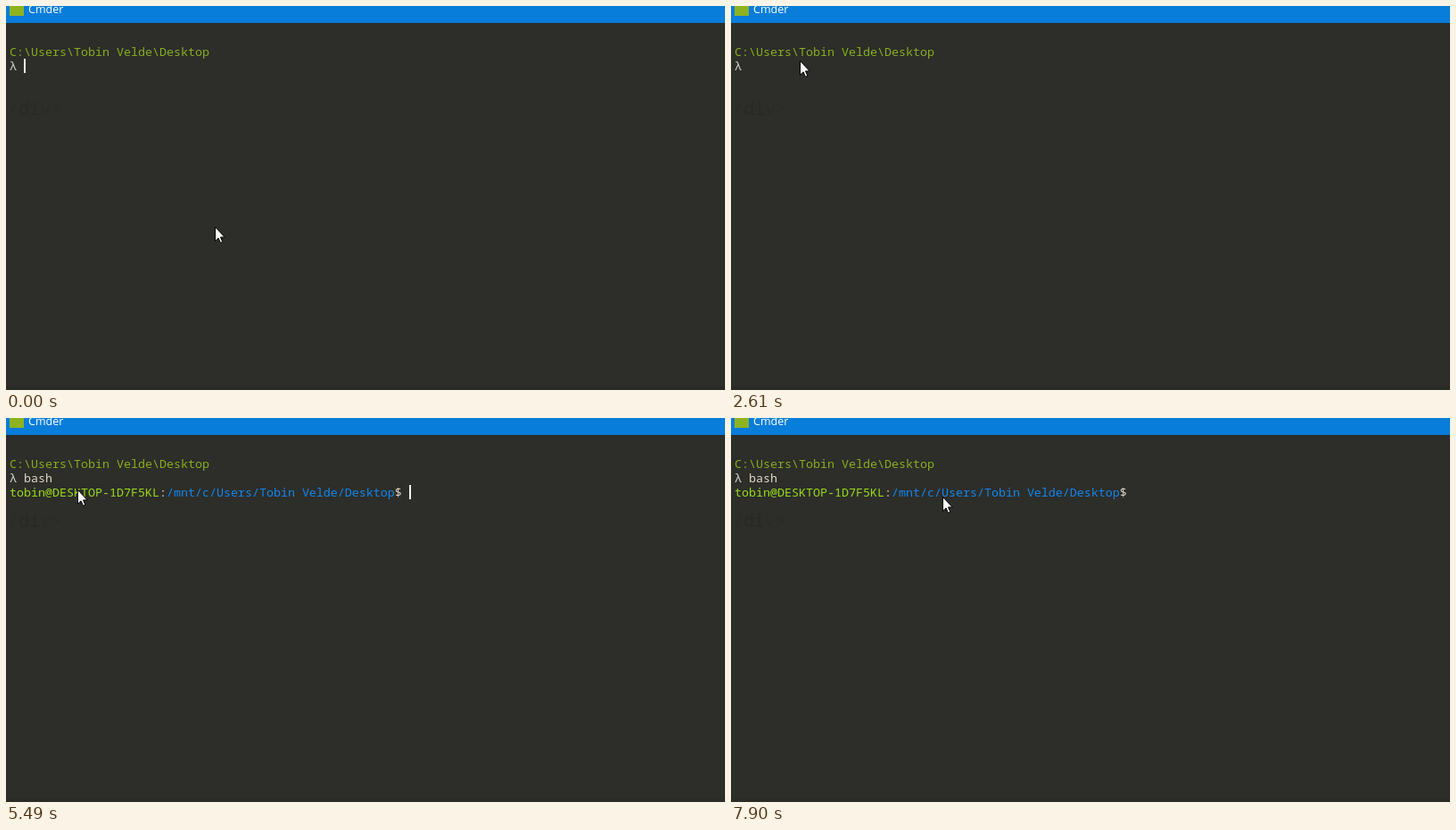
Write an HTML page that moves like this. It is 806 px wide and 430 px high and loops after 8 s.

```html
<!DOCTYPE html>
<html lang="en">
<head>
<meta charset="utf-8">
<title>Terminal</title>
<style>
  html, body { margin: 0; width: 100%; height: 100%; overflow: hidden; background: #2d2d29; }
  svg { display: block; width: 806px; height: 430px; }
  text { white-space: pre; }
  .mono { font: 13.333px "Noto Sans Mono", "DejaVu Sans Mono", monospace; }
  .title { font: 12.5px "Open Sans", "Noto Sans", sans-serif; fill: #fff; }
  .ghost { font-size: 20px; fill: #2b2b27; }
  .path { fill: #86b01e; }
  .plain { fill: #d6d4ca; }
  .input { fill: #e2dac6; }
  .user { fill: #98dc18; }
  .dir { fill: #1088f0; }
  .picked { fill: #2d2d29; }
  #beam { mix-blend-mode: difference; }
</style>
</head>
<body>
<svg viewBox="0 0 806 430">
  <defs>
    <clipPath id="pickedArea"><rect id="clip" height="16"/></clipPath>
  </defs>
  <rect width="806" height="430" fill="#2d2d29"/>
  <rect y="426" width="806" height="4" fill="#2a2a26"/>
  <rect width="806" height="19" fill="#087dda"/>
  <rect x="4" y="-5" width="16" height="16" fill="#8fb31f"/>
  <text class="title" x="25" y="8">Cmder</text>
  <text class="mono ghost" x="2" y="122">/<tspan fill="#282924">di</tspan>v&gt;</text>

  <g class="mono">
    <text class="path" x="4" y="56">C:\Users\Tobin Velde\Desktop</text>
    <text class="plain" x="4" y="72">λ</text>
    <text class="input" id="command" x="20" y="72"></text>
    <text id="prompt" x="4" y="88"><tspan class="user">tobin@DESKTOP-1D7F5KL</tspan><tspan class="plain">:</tspan><tspan class="dir">/mnt/c/Users/Tobin Velde/Desktop</tspan><tspan class="input">$</tspan></text>
  </g>
  <rect id="selection" height="16" fill="#cdd184"/>
  <g class="mono picked" clip-path="url(#pickedArea)">
    <text x="4" y="56">C:\Users\Tobin Velde\Desktop</text>
    <text x="4" y="88">tobin@DESKTOP-1D7F5KL:</text>
  </g>
  <rect id="caret" width="2" height="16" fill="#f2f2ee"/>
  <path id="arrow" d="M.5 .5V16.2L4.1 12.8L6.5 18.3L8.8 17.3L6.5 11.9H11.2Z" fill="#fff" stroke="#000"/>
  <path id="beam" d="M-3 -8h2.5M.5 -8h2.5M0 -7.5v15M-3 8h2.5M.5 8h2.5" fill="none" stroke="#fff"/>
</svg>
<script>
  const LOOP = 8000;
  const STEP = 136;      // the pointer is sampled at this interval
  const CELL = 8;
  const LEFT = 4;
  const BLINK = 560;
  const KEY_DELAY = 140;
  const TYPE = 3810, ENTER = 4790, PROMPT = 5490;
  const COMMAND = "bash";
  const $ = id => document.getElementById(id);

  const home = { x: 234, y: 247 };
  const moves = [
    { at: 0, for: 130, x: 383, y: 291 },
    { at: 150, for: 200, x: 165, y: 50 },
    { at: 1000, for: 240, x: 228, y: 48 },
    { at: 1400, for: 600, x: 16, y: 46 },
    { at: 2060, for: 110, x: 16, y: 55 },
    { at: 2190, for: 260, x: 76, y: 55 },
    { at: 2460, for: 390, x: 80, y: 80 },
    { at: 5500, for: 800, x: 8, y: 86 },
    { at: 6400, for: 780, x: 177, y: 90 },
    { at: 7360, for: 250, x: 262, y: 90 },
    { at: 7620, for: 250, x: 237, y: 88 }
  ];

  const clamp = (v, lo, hi) => Math.min(hi, Math.max(lo, v));
  const smooth = p => p * p * (3 - 2 * p);
  const mix = (a, b, p) => a + (b - a) * p;
  const within = (t, from, to) => t >= from && t < to;
  const rowTop = row => 43 + 16 * row;
  const snap = x => LEFT + CELL * Math.ceil((x - LEFT) / CELL);
  const show = (el, on) => el.setAttribute("visibility", on ? "visible" : "hidden");
  const set = (el, attrs) => {
    for (const name in attrs) el.setAttribute(name, attrs[name]);
  };

  function pointerAt(t) {
    const sample = Math.floor((t + 30) / STEP) * STEP;
    return moves.reduce((pos, move) => {
      const p = smooth(clamp((sample - move.at) / move.for, 0, 1));
      return { x: mix(pos.x, move.x, p), y: mix(pos.y, move.y, p) };
    }, home);
  }

  function selectionAt(t, x) {
    if (within(t, 1820, 2190)) return { row: 0, from: 164, to: 228 };
    if (within(t, 2340, 2610)) return { row: 0, from: 12, to: snap(x) };
    if (within(t, 6680, 7780)) return { row: 2, from: LEFT, to: Math.min(180, snap(x)) };
    return { row: 0, from: 0, to: 0 };
  }

  function caretAt(t, typed) {
    if (t < ENTER) return { x: 20 + CELL * typed, y: rowTop(1) };
    return { x: t < PROMPT ? LEFT : 452, y: rowTop(2) };
  }

  // blinking restarts at each input and stops while text is being selected
  function caretVisible(t) {
    if (within(t, 1240, 3220) || t >= 6920) return false;
    const lastKey = TYPE + (COMMAND.length - 1) * KEY_DELAY;
    const restart = [-KEY_DELAY, 3250, TYPE, lastKey, ENTER, PROMPT].filter(r => r <= t).pop();
    return Math.floor((t - restart) / BLINK) % 2 === 0;
  }

  function render(t) {
    const typed = clamp(1 + Math.floor((t - TYPE) / KEY_DELAY), 0, COMMAND.length);
    $("command").textContent = COMMAND.slice(0, typed);
    show($("prompt"), t >= PROMPT);

    set($("caret"), caretAt(t, typed));
    show($("caret"), caretVisible(t));

    const { x, y } = pointerAt(t);
    const px = Math.round(x), py = Math.round(y);
    const isBeam = within(t, 1240, 2610) || within(t, 6400, 7780);
    show($("arrow"), !isBeam);
    show($("beam"), isBeam);
    set($("arrow"), { transform: `translate(${px} ${py})` });
    set($("beam"), { transform: `translate(${px + 0.5} ${py + 0.5})` });

    const { row, from, to } = selectionAt(t, x);
    const box = { x: from, y: rowTop(row), width: to - from };
    set($("selection"), box);
    set($("clip"), box);
  }

  const start = performance.now();
  function tick() {
    render((performance.now() - start) % LOOP);
    requestAnimationFrame(tick);
  }
  tick();
</script>
</body>
</html>
```
